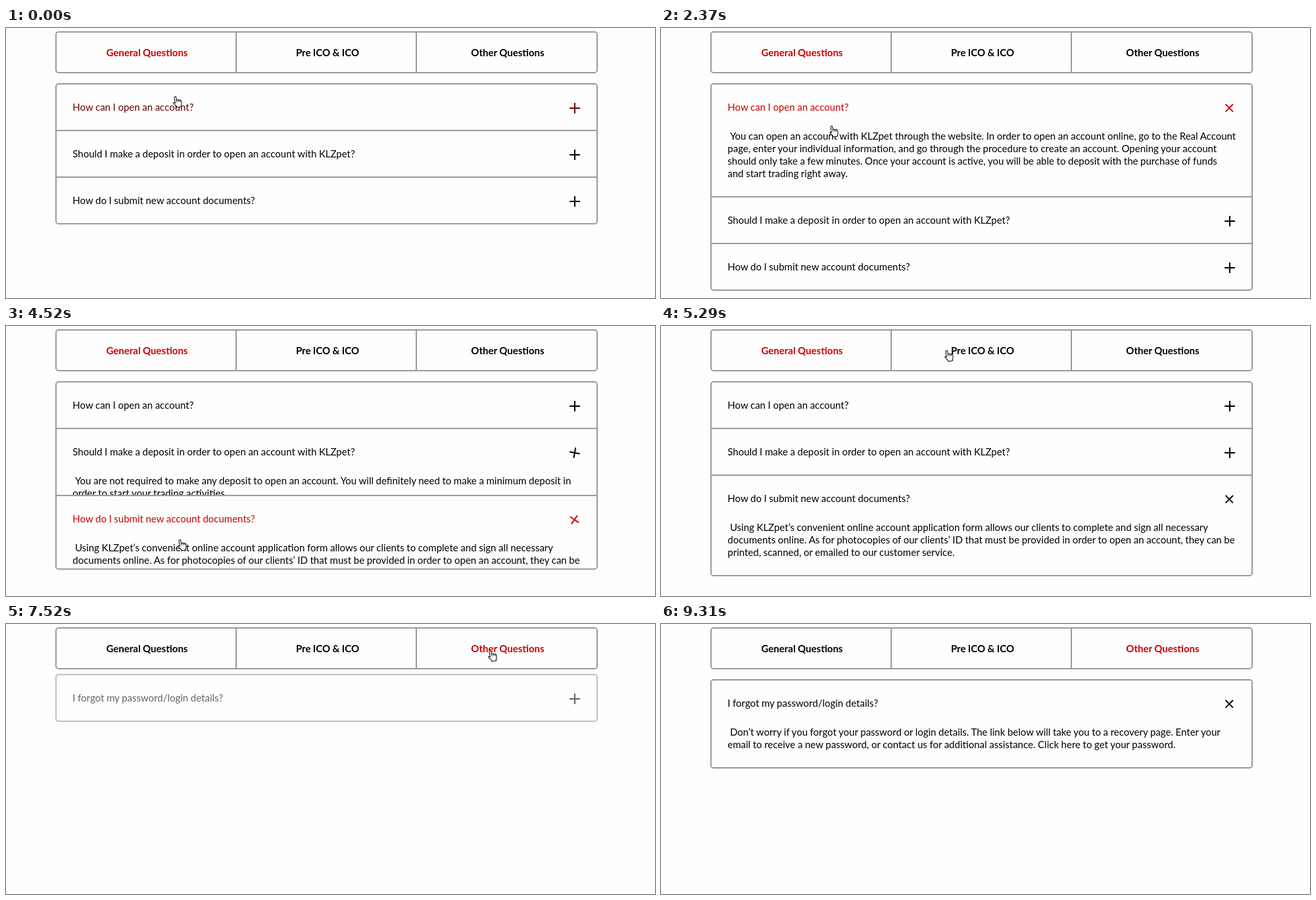
An HTML page that plays this animation: 987 px wide and 411 px high, repeating every 9960 ms.

```html
<!DOCTYPE html>
<html lang="en">
<head>
<meta charset="utf-8">
<title>FAQ accordion</title>
<style>
html, body { margin: 0; width: 100%; height: 100%; overflow: hidden; background: #fefefe; }
svg { display: block; width: 987px; height: 411px; }
text { font: 15px Lato, sans-serif; word-spacing: -.23px; white-space: pre; }
.tab { font-weight: 700; text-anchor: middle; }
.line { fill: none; stroke: #9b9b9b; stroke-width: 2; }
</style>
</head>
<body>
<svg id="stage" viewBox="0 0 987 411"></svg>
<script>
const LOOP = 9960, HEAD = 71, TOP = 85;
const NEVER = 1e6;
const SLIDE = 280, TURN = 300, TINT = 200;

// show/hide: panel visibility; open and hover: [start, end]
const panels = [
  { show: -NEVER, hide: 5640, items: [
    { q: 'How can I open an account?', open: [1580, 3200], hover: [-100, 2660], a: [
      'You can open an account with KLZpet through the website. In order to open an account online, go to the Real Account',
      'page, enter your individual information, and go through the procedure to create an account. Opening your account',
      'should only take a few minutes. Once your account is active, you will be able to deposit with the purchase of funds',
      'and start trading right away.'] },
    { q: 'Should I make a deposit in order to open an account with KLZpet?', open: [3200, 4380], hover: [2660, 3640], a: [
      'You are not required to make any deposit to open an account. You will definitely need to make a minimum deposit in',
      'order to start your trading activities.'] },
    { q: 'How do I submit new account documents?', open: [4380, NEVER], hover: [3640, 4960], a: [
      'Using KLZpet’s convenient online account application form allows our clients to complete and sign all necessary',
      'documents online. As for photocopies of our clients’ ID that must be provided in order to open an account, they can be',
      'printed, scanned, or emailed to our customer service.'] }
  ] },
  { show: 5825, hide: 7160, items: [
    { q: 'How secure is KLZpet?', open: [NEVER, NEVER], hover: [NEVER, NEVER], a: [] }
  ] },
  { show: 7345, hide: NEVER, items: [
    { q: 'I forgot my password/login details?', open: [8190, NEVER], hover: [7860, 8880], a: [
      'Don’t worry if you forgot your password or login details. The link below will take you to a recovery page. Enter your',
      'email to receive a new password, or contact us for additional assistance. Click here to get your password.'] }
  ] }
];

const tabs = [
  { label: 'General Questions', x: 214.5, red: [-NEVER, 5640] },
  { label: 'Pre ICO & ICO', x: 489, red: [5300, 7160] },
  { label: 'Other Questions', x: 763, red: [6760, NEVER] }
];

// cursor fingertip: time, x, y
const path = [
  [0, 257, 104], [110, 259, 121], [260, 259, 121], [270, 259, 122], [2180, 259, 122],
  [2900, 258, 287], [3480, 258, 287], [4010, 264, 325], [4640, 264, 325],
  [5290, 434, 37], [5410, 462, 29], [6300, 462, 29], [6640, 662, 55],
  [6740, 662, 55], [6920, 736, 40], [7560, 736, 40], [8150, 720, 125],
  [8690, 720, 125], [9310, 928, 415]
];

const clamp = v => Math.max(0, Math.min(1, v));
const ramp = (t, start, dur) => clamp((t - start) / dur);
const swing = p => .5 - Math.cos(p * Math.PI) / 2;
const pulse = (t, [on, off], dur, ease) => ease(ramp(t, on, dur)) - ease(ramp(t, off, dur));
const linear = p => p;

// cubic-bezier(.25, .1, .25, 1)
function ease(p) {
  if (p <= 0 || p >= 1) return clamp(p);
  const bez = (a, b, s) => 3 * a * s * (1 - s) ** 2 + 3 * b * s * s * (1 - s) + s ** 3;
  let lo = 0, hi = 1;
  for (let i = 0; i < 24; i++) {
    const mid = (lo + hi) / 2;
    if (bez(.25, .25, mid) < p) lo = mid; else hi = mid;
  }
  return bez(.1, 1, lo);
}

function add(parent, tag, attrs = {}, text) {
  const el = document.createElementNS('http://www.w3.org/2000/svg', tag);
  for (const k in attrs) el.setAttribute(k, attrs[k]);
  if (text) el.textContent = text;
  return parent.appendChild(el);
}
const move = (el, x, y) => el.setAttribute('transform', `translate(${x} ${y})`);
const tint = (el, p) => el.setAttribute('fill', `rgb(${Math.round(204 * p)},0,0)`);

const stage = document.getElementById('stage');
let clipCount = 0;

for (const panel of panels) {
  panel.g = add(stage, 'g');
  panel.box = add(panel.g, 'rect', { class: 'line', x: 76, y: TOP, width: 823, rx: 4 });
  panel.items.forEach((item, i) => {
    const id = 'clip' + clipCount++;
    item.g = add(panel.g, 'g');
    item.clip = add(add(item.g, 'clipPath', { id }), 'rect', { x: 76, y: HEAD, width: 823 });
    if (i) add(item.g, 'path', { class: 'line', d: 'M76 0H899' });
    item.head = add(item.g, 'g');
    add(item.head, 'text', { x: 101.3, y: 41 }, item.q);
    // the plus sits 1px below its turning point
    item.icon = add(item.head, 'path', { d: 'M-8 0H-1V-7H1V0H8V2H1V9H-1V2H-8Z' });
    const body = add(item.g, 'g', { 'clip-path': `url(#${id})` });
    item.a.forEach((s, n) => add(body, 'text', { x: n ? 101.3 : 104.9, y: 85 + 19 * n }, s));
    item.full = 25 + 19 * item.a.length;
  });
}

add(stage, 'rect', { class: 'line', x: 76, y: 6, width: 823, height: 62, rx: 4 });
add(stage, 'path', { class: 'line', d: 'M350 6V68M624 6V68' });
for (const tab of tabs) tab.el = add(stage, 'text', { class: 'tab', x: tab.x, y: 43 }, tab.label);

const hand = add(stage, 'g');
const handArt = add(hand, 'g', {
  transform: 'rotate(-10)', stroke: '#000', 'stroke-linejoin': 'round', 'stroke-linecap': 'round'
});
add(handArt, 'path', {
  fill: '#fff',
  d: 'M-1.4 1.6Q-1.4.4 0 .4T1.4 1.6V6.2Q2.8 5.3 4 6.7Q5.4 5.9 6.3 7.3Q8.2 6.8 8.2 8.8V12.5L6.8 15V17.3H-.2V15.4L-3.8 10.6Q-4.2 8.7-2.8 9L-1.4 10.3Z'
});
add(handArt, 'path', { fill: 'none', d: 'M1.4 6.2V9M4 6.7V9.3M6.3 7.3V9.6', 'stroke-width': .8 });

function drawPanel(panel, t) {
  const shown = ease(ramp(t, panel.show, 500));
  const gone = ease(ramp(t, panel.hide, 185));
  panel.g.setAttribute('opacity', shown * (1 - gone));
  move(panel.g, 0, Math.round(20 * (shown - 1 + gone)));
  let y = TOP;
  for (const item of panel.items) {
    const height = Math.round(item.full * pulse(t, item.open, SLIDE, swing));
    const angle = 45 * pulse(t, item.open, TURN, ease);
    move(item.g, 0, y);
    item.clip.setAttribute('height', height);
    item.icon.setAttribute('transform', `translate(865 36) rotate(${angle})`);
    tint(item.head, pulse(t, item.hover, TINT, linear));
    y += HEAD + height;
  }
  panel.box.setAttribute('height', y - TOP);
}

function drawCursor(t) {
  let i = 0;
  while (i < path.length - 2 && t >= path[i + 1][0]) i++;
  const [t0, x0, y0] = path[i], [t1, x1, y1] = path[i + 1];
  const p = swing(ramp(t, t0, t1 - t0));
  move(hand, Math.round(x0 + (x1 - x0) * p), Math.round(y0 + (y1 - y0) * p));
}

function draw(t) {
  for (const panel of panels) drawPanel(panel, t);
  for (const tab of tabs) tint(tab.el, pulse(t, tab.red, TINT, linear));
  drawCursor(t);
}

const start = performance.now();
function tick() {
  draw((performance.now() - start) % LOOP);
  requestAnimationFrame(tick);
}
draw(0);
requestAnimationFrame(tick);
</script>
</body>
</html>
```
